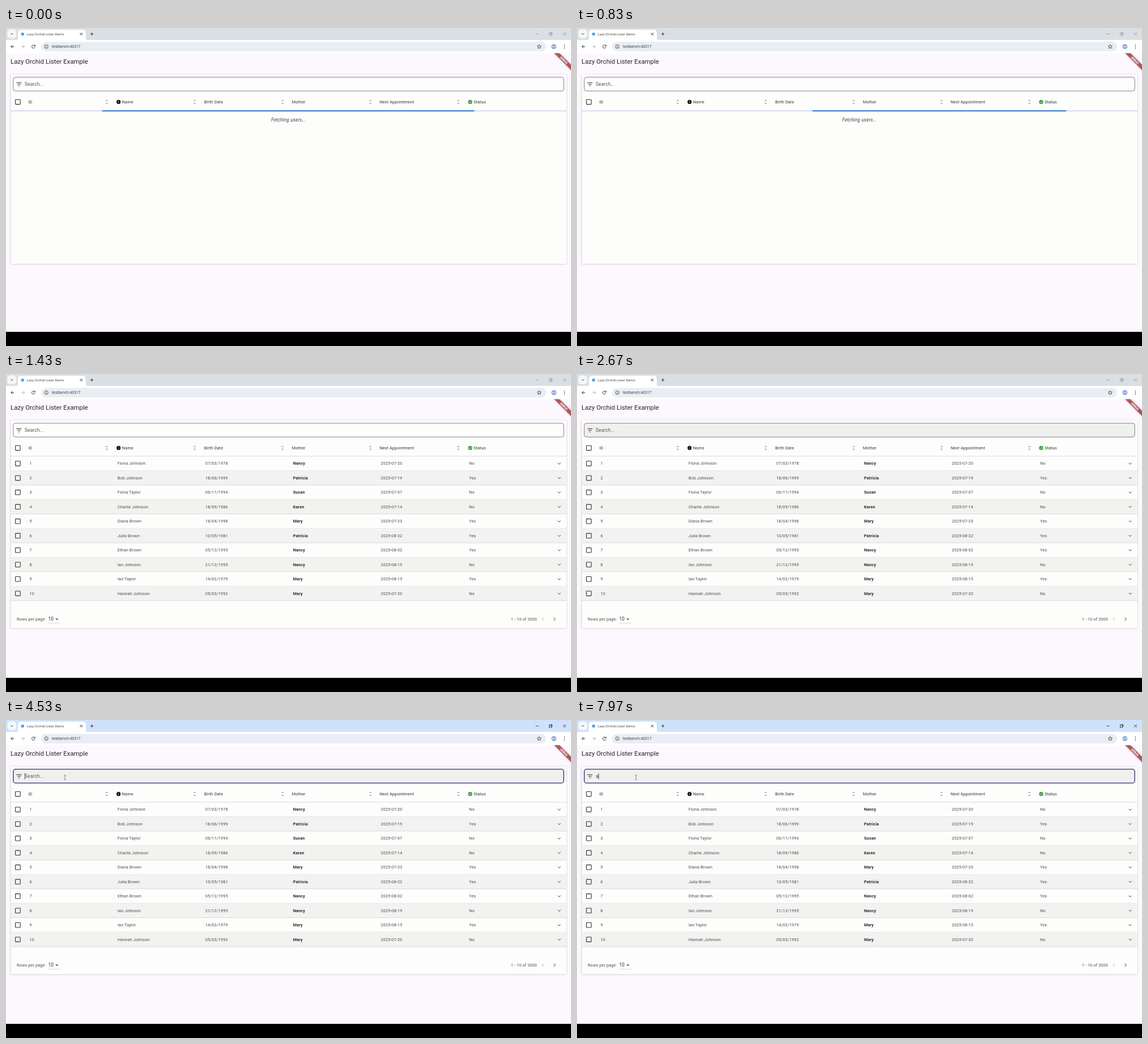
Write an HTML page that moves like this. It is 998x561 px and loops after 8 s.

```html
<!DOCTYPE html>
<html lang="en">
<head>
<meta charset="utf-8">
<title>Table demo</title>
<style>
  html, body { margin: 0; width: 100%; height: 100%; overflow: hidden; background: #000; }
  svg { display: block; width: 100%; height: 100%; }
  text { font-family: Roboto, sans-serif; white-space: pre; }
  .chrome { font-family: "Open Sans", sans-serif; fill: #2b2b2d; }
  .line { fill: none; stroke: #333; stroke-width: 1; }
</style>
</head>
<body>
<svg id="stage" viewBox="0 0 998 561"></svg>
<script>
const LOOP = 8000;
const LOADED = 1417, HOVER = 2670, ACTIVE = 3070, FOCUS = 3100;
const TYPE_A = 5720, TYPE_L = 5950, FILTERED = 6100, ERASE = 7600, RESTORED = 7720;
const ROW_TOP = 145, ROW_H = 25.48;
const COLUMNS = [39.5, 195, 350, 505, 660, 816];
const TITLE = 'Lazy Orchid Lister';

const allRows = `1|Fiona Johnson|07/03/1978|Nancy|2025-07-20|No
2|Bob Johnson|18/06/1999|Patricia|2025-07-19|Yes
3|Fiona Taylor|06/11/1994|Susan|2025-07-07|No
4|Charlie Johnson|18/09/1986|Karen|2025-07-14|No
5|Diana Brown|18/04/1998|Mary|2025-07-23|Yes
6|Julia Brown|10/05/1981|Patricia|2025-08-22|Yes
7|Ethan Brown|05/12/1995|Nancy|2025-08-02|Yes
8|Ian Johnson|21/12/1995|Nancy|2025-08-19|No
9|Ian Taylor|14/02/1979|Mary|2025-08-15|Yes
10|Hannah Johnson|05/03/1992|Mary|2025-07-20|No`;

const matchingRows = `15|Alice Taylor|19/02/1989|Patricia|2025-08-07|Yes
40|Alice Taylor|12/10/1976|Mary|2025-07-13|No
50|Alice Johnson|22/02/1974|Karen|2025-07-18|Yes
51|Alice Johnson|06/09/1986|Karen|2025-07-03|No
53|Alice Johnson|24/10/1980|Mary|2025-07-13|No
64|Alice Brown|28/09/1991|Patricia|2025-07-27|No
71|Alice Johnson|02/08/1976|Linda|2025-07-04|Yes
84|Alice Taylor|17/06/1979|Mary|2025-08-26|Yes
88|Alice Brown|04/09/1976|Nancy|2025-08-12|No
113|Alice Johnson|24/04/1973|Mary|2025-08-03|Yes`;

// Text centred vertically on y.
const label = (x, y, str, { size = 7.27, fill = '#4c4c4c', spacing = 0.13, more = '' } = {}) =>
  `<text x="${x}" y="${y + size * 0.355}" font-size="${size}" fill="${fill}" letter-spacing="${spacing}" ${more}>${str}</text>`;
const rect = (x, y, w, h, fill, more = '') =>
  `<rect x="${x}" y="${y}" width="${w}" height="${h}" fill="${fill}" ${more}/>`;
const path = (d, more = '') => `<path class="line" d="${d}" ${more}/>`;
const circle = (x, y, r, more) => `<circle cx="${x}" cy="${y}" r="${r}" ${more}/>`;
const checkbox = y => rect(16.6, y - 4.2, 8.6, 8.4, 'none', 'rx=".8" stroke="#333" stroke-width="1.1"');

function browser() {
  return rect(0, 0, 998, 22, '#d9dfe2', 'id="strip"')
    + rect(2.5, 2.5, 15.5, 15.5, '#f4f7f9', 'rx="5"')
    + path('M8.3 9.5l2 2 2-2')
    + path('M17 22q4 0 4-4V9q0-6 6-6h108q6 0 6 6v9q0 4 4 4z', 'style="fill:#fff;stroke:none"')
    + circle(29.3, 10.7, 2.7, 'fill="#45a5ea"')
    + `<text class="chrome" x="37" y="13" font-size="5.8">${TITLE} Demo</text>`
    + path('M130.8 8.4l4.4 4.4m0-4.4l-4.4 4.4M149 10.6h5.4m-2.7-2.7v5.4')
    + `<g id="controls" class="line" style="stroke-width:.8">
        <path d="M935.5 10.5h5M984 8l5 5m0-5l-5 5M960.8 8.8v-.6h3.8v3.8h-.6"/>
        <rect x="959.6" y="9" width="4" height="4"/></g>`
    + rect(0, 21, 998, 23.5, '#fff')
    + rect(62, 24.5, 892, 17, '#e9eef4', 'rx="8.5"')
    + path('M14.3 32.8H8.8m2.6-2.6l-2.6 2.6 2.6 2.6')
    + path('M27.2 32.8h5.5m-2.6-2.6l2.6 2.6-2.6 2.6', 'style="stroke:#b0b0b0"')
    + path('M50.7 31.2a2.8 2.8 0 1 0 .4 2.4M51.4 29.6v2.2h-2.2')
    + circle(71.2, 32.8, 3.2, 'class="line" style="stroke-width:.8"')
    + path('M71.2 32.3v2.4m0-3.9v.7', 'style="stroke-width:.8"')
    + '<text class="chrome" x="81" y="35" font-size="6.5">testbench:40317</text>'
    + path('M941.8 29.2l1 2.4 2.6.2-2 1.7.7 2.5-2.3-1.4-2.3 1.4.7-2.5-2-1.7 2.6-.2z', 'style="stroke-width:.8"')
    + circle(967.8, 32.8, 3.7, 'class="line" style="stroke:#2f66c4"')
    + circle(967.8, 31.8, 1.3, 'fill="#2f66c4"')
    + path('M965.5 35.2q2.3-2 4.6 0', 'style="stroke:#2f66c4"')
    + [30, 32.8, 35.6].map(y => circle(986.4, y, 0.8, 'fill="#333"')).join('');
}

function debugBanner() {
  return `<svg x="900" y="44.5" width="98" height="60"><g transform="translate(98 0) rotate(45)">
    ${rect(-40, 14.5, 80, 6.3, '#000', 'opacity=".35" filter="url(#soft)"')}
    ${rect(-40, 14.5, 80, 6.3, '#b0565a')}
    ${label(0, 17.7, 'DEBUG', { size: 5.2, fill: '#fff', spacing: 0, more: 'text-anchor="middle" font-weight="900"' })}
    </g></svg>`;
}

function header() {
  const names = ['ID', 'Name', 'Birth Date', 'Mother', 'Next Appointment', 'Status'];
  const titles = names.map((name, i) =>
    label(COLUMNS[i] + (name === 'Name' || name === 'Status' ? 10 : 0), 130.4, name, { fill: '#333' }));
  const sorters = [178, 333.3, 488.6, 643.8, 799].map(x =>
    path(`M${x - 1.6} 128.7l1.6-1.6 1.6 1.6m-3.2 3.3l1.6 1.6 1.6-1.6`, 'style="stroke-width:.8"'));
  return checkbox(130.4) + titles.join('') + sorters.join('')
    + circle(198.8, 130.4, 3.6, 'fill="#111"')
    + path('M198.8 130v2.3m0-4.1v.9', 'style="stroke:#fff;stroke-width:.8"')
    + circle(819.9, 130.4, 3.7, 'fill="#43a047"')
    + path('M818.1 130.5l1.3 1.3 2.4-2.5', 'style="stroke:#fff;stroke-width:.9"');
}

function table(id, source, total) {
  const rows = source.split('\n').map((row, i) => {
    const top = ROW_TOP + i * ROW_H, y = top + 12.9;
    const cells = row.split('|').map((cell, c) =>
      label(COLUMNS[c] + 2, y, cell, c === 3 ? { fill: '#2c2c2c', more: 'font-weight="700"' } : {}));
    return (i % 2 ? rect(8.5, top, 981.5, ROW_H, '#f2f3f0') : '')
      + rect(8.5, top + ROW_H - 0.4, 981.5, 0.8, '#d0d0e2')
      + checkbox(y) + cells.join('') + path(`M974.8 ${y - 1.1}l2.4 2.4 2.4-2.4`);
  });
  return `<g id="${id}">${rect(8.5, 144.6, 981.5, 0.8, '#d0d0e2')}${rows.join('')}`
    + label(19, 432.4, 'Rows per page:')
    + label(74.5, 432.4, '10', { size: 8.3, fill: '#333' })
    + path('M87.2 431.4h5.4l-2.7 2.7z', 'style="fill:#444;stroke:none"')
    + rect(74.5, 439.2, 21, 0.6, '#c4c4c8')
    + label(938, 432.4, `1 - 10 of ${total}`, { more: 'text-anchor="end"' })
    + path('M949.6 429.8l-2.6 2.6 2.6 2.6', 'style="stroke:#aaa"')
    + path('M967.6 429.8l2.6 2.6-2.6 2.6') + '</g>';
}

const $ = id => document.getElementById(id);
const set = (id, attrs) => Object.entries(attrs).forEach(([k, v]) => $(id).setAttribute(k, v));
const show = (id, on) => $(id).setAttribute('visibility', on ? 'visible' : 'hidden');

$('stage').innerHTML = `<defs><filter id="soft" x="-20%" y="-80%" width="140%" height="260%">
    <feGaussianBlur stdDeviation="1.4"/></filter></defs>`
  + rect(0, 44, 998, 492, '#fdf7fe') + browser()
  + label(8, 59.3, `${TITLE} Example`, { size: 11.4, fill: '#252428', spacing: 0 })
  + rect(8, 82.5, 982, 334, '#000', 'id="shadow" rx="2" opacity=".2" filter="url(#soft)"')
  + rect(8.5, 82, 981.5, 334, '#fdfdfc', 'id="card" rx="1.5"')
  + rect(12.8, 86.8, 972.4, 24.4, '#fdfdfc', 'id="field" rx="4"')
  + path('M18.3 96.4h9.2M19.9 99.2h6M21.7 102h2.4')
  + label(33, 99, 'Search...', { size: 8.3, fill: '#555', spacing: 0.15, more: 'id="hint"' })
  + label(33.3, 99, '', { size: 8.3, fill: '#333', spacing: 0.26, more: 'id="query"' })
  + rect(33, 94, 1, 10.6, '#46467f', 'id="caret"')
  + path('M102.3 97.6h1.3l.6.5.6-.5h1.3m-1.9.5v6.8m-1.9.5h1.3l.6-.5.6.5h1.3', 'id="pointer" style="stroke:#555;stroke-width:.7"')
  + header()
  + `<g id="loading">${rect(8.5, 144.8, 981.5, 2.6, '#dfdff4')}
      <rect id="bar1" y="145" height="2.3" fill="#4a8ad4"/><rect id="bar2" y="145" height="2.3" fill="#4a8ad4"/>
      ${label(499, 161.8, 'Fetching users...', { size: 8.3, fill: '#444', more: 'text-anchor="middle" font-style="italic"' })}</g>`
  + table('full', allRows, 2000) + table('filtered', matchingRows, 178)
  + debugBanner() + rect(0, 536, 998, 25, '#000');

const clamp = v => Math.min(1, Math.max(0, v));

function bezier(x1, y1, x2, y2, x) {
  const at = (a, b, s) => 3 * a * s * (1 - s) ** 2 + 3 * b * s * s * (1 - s) + s ** 3;
  let lo = 0, hi = 1;
  for (let i = 0; i < 24; i++) {
    const mid = (lo + hi) / 2;
    if (at(x1, x2, mid) < x) lo = mid; else hi = mid;
  }
  return at(y1, y2, (lo + hi) / 2);
}

function drawProgress(t) {
  const phase = (t + 583) % 1800;
  const edge = (start, length, x1, x2) => bezier(x1, 0, x2, 1, clamp((phase - start) / length));
  const bar = (id, head, tail) => set(id, { x: 8.5 + 981.5 * tail, width: 981.5 * Math.max(0, head - tail) });
  bar('bar1', edge(0, 750, 0.2, 0.8), edge(333, 750, 0.4, 1));
  bar('bar2', edge(1000, 567, 0, 0.65), edge(1267, 533, 0.1, 0.45));
}

function render(t) {
  const loaded = t >= LOADED, active = t >= ACTIVE, focused = t >= FOCUS;
  const filtered = t >= FILTERED && t < RESTORED;
  const height = loaded ? 366.5 : 334;
  set('card', { height });
  set('shadow', { height });
  show('loading', !loaded);
  show('full', loaded && !filtered);
  show('filtered', filtered);
  drawProgress(t);

  set('strip', { fill: active ? '#d0e2fb' : '#d9dfe2' });
  set('controls', { stroke: active ? '#222' : '#8b9094' });
  $('controls').style.stroke = active ? '#222' : '#8b9094';
  show('pointer', active);

  set('field', {
    fill: t >= HOVER ? '#f0f1ee' : '#fdfdfc',
    stroke: focused ? '#4c4c88' : '#70707f',
    'stroke-width': 0.9 + 0.7 * clamp((t - FOCUS) / 167),
  });
  const query = t < TYPE_A ? '' : t < TYPE_L || t >= ERASE ? 'a' : 'al';
  $('query').textContent = query;
  show('hint', !query);
  set('caret', { x: 33 + (query ? $('query').getComputedTextLength() : 0) });
  show('caret', focused && (query || Math.floor((t - FOCUS) / 500) % 2 === 0));
}

const begin = performance.now();
function tick() {
  render((performance.now() - begin) % LOOP);
  requestAnimationFrame(tick);
}
tick();
</script>
</body>
</html>
```
